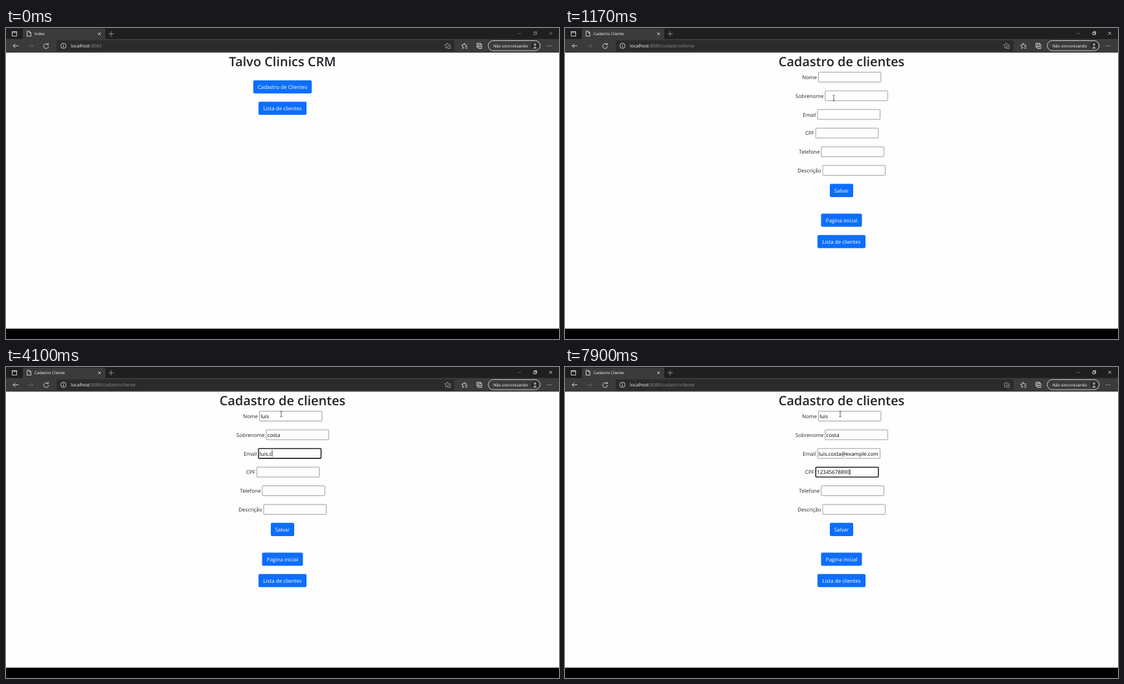
Write an HTML page that moves like this. It is 852 px wide and 480 px high and loops after 8 s.

```html
<!DOCTYPE html>
<html lang="pt">
<head>
<meta charset="utf-8">
<title>Cadastro</title>
<style>
html, body { margin: 0; height: 100%; overflow: hidden; background: #000; }
svg { display: block; width: 100vw; height: 100vh; }
text { font: 8px "Open Sans", "Noto Sans", sans-serif; fill: #212529; text-rendering: geometricPrecision; white-space: pre; }
.mid { text-anchor: middle; }
.end { text-anchor: end; }
.h1 { font-size: 19.9px; font-weight: 600; }
.btn rect { fill: #0d6efd; }
.btn text { fill: #fff; }
.bar text { fill: #fff; font-size: 6.1px; }
.bar .url { font-size: 7px; }
.bar .dim { fill: #8c8c8c; }
.icon { fill: none; stroke: #f2f2f2; stroke-width: .8; }
.soft { stroke: #a8a8a8; }
.faint { stroke: #6a6a6a; }
.box { fill: #fefefe; stroke: #767676; stroke-width: .7; }
.box.on { stroke: #000; stroke-width: 1.3; }
.typed { fill: #000; }
</style>
</head>
<body>
<svg viewBox="0 0 852 480">
  <rect width="852" height="480"/>
  <rect y="38" width="852" height="426" fill="#fefefe"/>
  <g class="bar">
    <rect width="852" height="38" fill="#3b3b3b"/>
    <path d="M0 0H852V17H153V3Q153 1 151 1H28Q26 1 26 3V17H0Z" fill="#1f1f1f"/>
    <rect x="78" y="19" width="613" height="17" rx="2" fill="#2b2b2b"/>
    <path class="icon" d="M9.5 5.5h7v7h-7zM9.5 7h7M32.5 5h3.5l2.5 2.5v5h-6zM36 5v2.5h2.5M142 7l4 4m0-4l-4 4"/>
    <path class="icon soft" d="M158 9h8M162 5v8"/>
    <path class="icon" d="M19 27.5h-8m3.5-3.5L11 27.5l3.5 3.5M64.6 25.5A3.7 3.7 0 1 0 65.5 28M65.2 23v2.7h-2.7"/>
    <path class="icon faint" d="M34 27.5h8m-3.5-3.5l3.5 3.5l-3.5 3.5"/>
    <circle class="icon" cx="88.5" cy="27.5" r="4"/>
    <path class="icon" d="M88.5 27v3M88.5 25v1"/>
    <path class="icon soft" d="M684 27l.5-1-3-.4L680 23l-1.3 2.6-3 .4 2.2 2-.5 3 2-1M680.5 28h4v3.5h-4z"/>
    <path class="icon" d="M706 30l-2.5 1.5.5-3-2.2-2 3-.4L706 23.5l1.3 2.6h3M707.5 28.5h3.5M707.5 31h3.5"/>
    <path class="icon" d="M727 29.5h-1.5v-6h6v1.5M727.5 25.5h5.5v6h-5.5zM730.2 27v3M728.7 28.5h3"/>
    <rect class="icon" x="743" y="19.5" width="80" height="15.5" rx="7.7"/>
    <text x="751" y="29.7">Não sincronizando</text>
    <circle cx="815" cy="27.3" r="5.5" fill="#262626"/>
    <path d="M812.5 32q0-3.5 2.5-3.5t2.5 3.5z" fill="#a39588"/>
    <circle cx="815" cy="25.5" r="2" fill="#a39588"/>
    <path class="icon" d="M833.5 27.5h1.2m1.7 0h1.2m1.7 0h1.2"/>
    <path class="icon faint" d="M788.5 8.5h5"/>
    <path id="win" class="icon" d="M837 6l4.5 4.5m0-4.5l-4.5 4.5M813 7h3.5v3.5h-3.5zM814 7V5.7h3.7v3.7h-1.2"/>
    <text id="tab" x="44" y="11.2"></text>
    <text class="url" x="100" y="30">localhost<tspan id="path" class="dim"></tspan></text>
  </g>
  <g id="home"></g>
  <g id="form"></g>
  <rect id="caret" width=".8" height="10"/>
  <path id="beam" d="M-1.5-4h3M0-4v8M-1.5 4h3" fill="none" stroke="#000" stroke-width=".6"/>
</svg>
<script>
const LOOP = 8000, BLINK = 267, HOVER = 800, CLICK = 930, OPEN = 1020;
const $ = id => document.getElementById(id);

function add(parent, tag, attrs, text = "") {
  const el = document.createElementNS("http://www.w3.org/2000/svg", tag);
  for (const k in attrs) el.setAttribute(k, attrs[k]);
  el.textContent = text;
  return parent.appendChild(el);
}

const heading = (page, text) => add(page, "text", { class: "h1 mid", x: 426, y: 59 }, text);

function button(page, text, y, width) {
  const g = add(page, "g", { class: "btn" });
  const face = add(g, "rect", { x: 426 - width / 2, y, width, height: 20.3, rx: 2 });
  add(g, "text", { class: "mid", x: 426, y: y + 13.1 }, text);
  return face;
}

const home = $("home"), form = $("form");
heading(home, "Talvo Clinics CRM");
const register = button(home, "Cadastro de Clientes", 80.7, 90);
button(home, "Lista de clientes", 113.7, 74);

heading(form, "Cadastro de clientes");
button(form, "Salvar", 240.6, 36);
button(form, "Pagina inicial", 286.4, 63);
button(form, "Lista de clientes", 319.4, 74);

// runs: [first key, last key, number of keys]
const fields = [
  { label: "Nome", x: 390, text: "luis", focus: 1430, runs: [[1770, 2030, 4]] },
  { label: "Sobrenome", x: 400.4, text: "costa", focus: 2135, runs: [[2750, 3130, 5]] },
  { label: "Email", x: 388.6, text: "luis.costa@example.com", focus: 3400,
    runs: [[3758, 4370, 10], [4690, 5030, 6], [5230, 5330, 2], [5670, 5870, 4]] },
  { label: "CPF", x: 386, text: "12345678890", focus: 6000,
    runs: [[6470, 6925, 6], [7070, 7265, 4], [7890, 7890, 1]] },
  { label: "Telefone", x: 394.4, text: "", focus: Infinity, runs: [] },
  { label: "Descrição", x: 396.6, text: "", focus: Infinity, runs: [] }
];
fields.forEach((f, i) => {
  f.y = 67.8 + i * 28.8;
  add(form, "text", { class: "end", x: f.x - 2, y: f.y + 11.1 }, f.label);
  f.box = add(form, "rect", { x: f.x + .4, y: f.y + .4, width: 96.4, height: 15.2, rx: 1 });
  f.value = add(form, "text", { class: "typed", x: f.x + 2.2, y: f.y + 11.1 });
  f.keys = f.runs.flatMap(([a, b, n]) =>
    Array.from({ length: n }, (_, k) => n > 1 ? a + (b - a) * k / (n - 1) : a));
});

const show = (el, on) => el.setAttribute("visibility", on ? "visible" : "hidden");
const clamp = v => Math.max(0, Math.min(1, v));
const ease = v => v * v * (3 - 2 * v);
const mix = (a, b, p) => a + (b - a) * p;

function drawBeam(t) {
  const down = ease(clamp((t - OPEN) / 140)), up = ease(clamp((t - 1170) / 250));
  const x = mix(mix(411, 414, down), 424, up), y = mix(mix(99, 108, down), 72.7, up);
  $("beam").setAttribute("transform", `translate(${x} ${y})`);
}

function drawRegister(t) {
  const hover = clamp((t - HOVER) / 70), ring = clamp((t - CLICK) / 70);
  register.style.fill = `rgb(${mix(13, 11, hover)},${mix(110, 94, hover)},${mix(253, 215, hover)})`;
  register.style.stroke = `rgba(49,132,253,${ring / 2})`;
  register.style.strokeWidth = 4 * ring;
  register.style.paintOrder = "stroke";
}

function draw(t) {
  const opened = t >= OPEN;
  show(home, !opened);
  show(form, opened);
  show($("beam"), opened);
  $("tab").textContent = opened ? "Cadastro Cliente" : "Index";
  $("path").textContent = opened ? ":8080/cadastrocliente" : ":8080";
  $("win").style.opacity = opened ? 1 : .45;
  drawRegister(t);
  drawBeam(t);

  const active = fields.filter(f => t >= f.focus).pop();
  for (const f of fields) {
    f.box.setAttribute("class", f === active ? "box on" : "box");
    f.value.textContent = f.text.slice(0, f.keys.filter(k => t >= k).length);
  }
  if (!active) return show($("caret"), false);
  const last = [active.focus, ...active.keys].filter(k => t >= k).pop();
  show($("caret"), Math.floor((t - last) / BLINK) % 2 === 0);
  $("caret").setAttribute("x", active.x + 2.3 + active.value.getComputedTextLength());
  $("caret").setAttribute("y", active.y + 3);
}

const start = performance.now();
function tick() {
  draw((performance.now() - start) % LOOP);
  requestAnimationFrame(tick);
}
tick();
</script>
</body>
</html>
```
